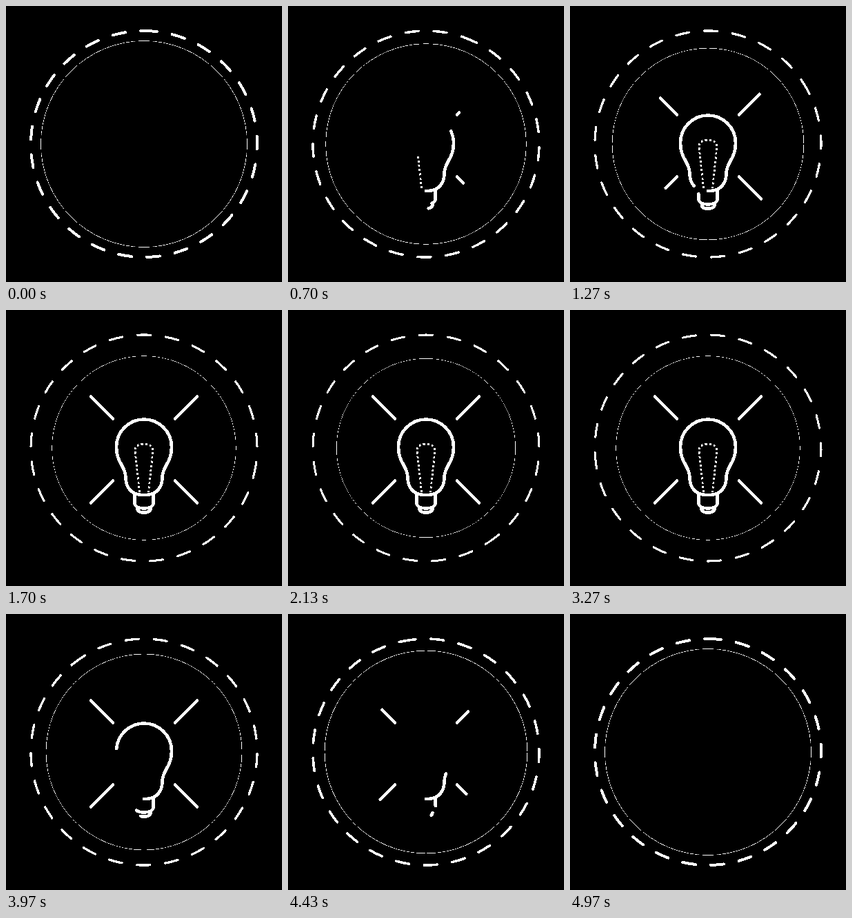
These frames come from a looping animation (400x400 px, 5010 ms). An HTML page:

```html
<!DOCTYPE html>
<html>
<head>
<meta charset="utf-8">
<style>
html, body { margin: 0; width: 100%; height: 100%; overflow: hidden; background: #000; }
svg { display: block; width: 100vw; height: 100vh; }
svg * { fill: none; stroke: #fff; shape-rendering: crispEdges; }
.bulb, .ray { stroke-width: 4.6; stroke-linecap: round; stroke-linejoin: round; }
#dashes { stroke-linecap: round; stroke-dasharray: 19 22; }
#ring { shape-rendering: geometricPrecision; }
#dots { stroke-width: 2.8; stroke-dasharray: 3 3.2; }
#wipe { stroke-width: 6; }
</style>
</head>
<body>
<svg viewBox="0 0 400 400">
  <!-- Hard edge: keeps only pixels at least half covered -->
  <filter id="hard" filterUnits="userSpaceOnUse" x="0" y="0" width="400" height="400" color-interpolation-filters="sRGB">
    <feComponentTransfer><feFuncA type="discrete" tableValues="0 1"/></feComponentTransfer>
  </filter>
  <mask id="reveal" maskUnits="userSpaceOnUse" x="0" y="0" width="400" height="400">
    <path id="wipe" pathLength="1" d="M193.5 264L187.3 207C186 198 190 194.5 200 194.5S214 198 212.7 207L206.5 264"/>
  </mask>
  <circle id="dashes" cx="200" cy="200" r="164"/>
  <g filter="url(#hard)"><circle id="ring" cx="200" cy="200"/></g>
  <g mask="url(#reveal)">
    <path id="dots" d="M193.5 264L187.3 207C186 198 190 194.5 200 194.5S214 198 212.7 207L206.5 264"/>
  </g>
  <path class="bulb" pathLength="1" d="M200 268H204C219 267 226.5 256 226.5 243C226.5 226 240 222 240 198.5A40 40 0 0 0 160 198.5C160 222 173.5 226 173.5 243C173.5 256 181 267 196 268Z"/>
  <path class="bulb" pathLength="1" d="M213.7 268V279C213.7 285 207 287.5 200 287.5S186.3 285 186.3 279V268"/>
  <path class="bulb" pathLength="1" d="M209.5 288C209.5 295.5 190.5 295.5 190.5 288"/>
  <path class="ray" pathLength="1" d="M245 247.5L277 279.3"/>
  <path class="ray" pathLength="1" d="M245 157.5L277 125.5"/>
  <path class="ray" pathLength="1" d="M155 157.5L123 125.5"/>
  <path class="ray" pathLength="1" d="M155 247.5L123 279.3"/>
</svg>
<script>
const LOOP = 5010, LAST = 119, RADIUS = 149.5;
const $ = id => document.getElementById(id);
const all = s => [...document.querySelectorAll(s)];
const bulb = all('.bulb'), rays = all('.ray');

// Eased progress from a to b
function ease(x, a, b) {
  const u = Math.min(1, Math.max(0, (x - a) / (b - a)));
  return u * u * (3 - 2 * u);
}

function trim(path, part) {
  path.style.visibility = part > 0.002 ? 'visible' : 'hidden';
  path.style.strokeDasharray = part >= 1 ? 'none' : part + ' 2';
}

// Draws in from a to b, retracts from c to d
const inOut = (f, a, b, c, d) => ease(f, a, b) - ease(f, c, d);

function draw(ms) {
  // 24 fps motion shown on a 30 fps clock
  const tick = Math.floor((ms + 5) * 0.03);
  const f = Math.min(LAST, Math.floor(tick * 0.8 + 0.3));
  const u = f / LAST;

  $('dashes').setAttribute('transform', `rotate(${360 * ease(u, 0, 1) - 90} 200 200)`);
  $('dashes').style.strokeWidth = 4 - 4 * u * (1 - u);

  const scale = 1 - 0.14 * inOut(u, 0, 0.5, 0.5, 1);
  $('ring').setAttribute('r', RADIUS * scale);
  $('ring').style.strokeWidth = 0.8 * scale;

  trim($('wipe'), inOut(f, 10, 29, 79, 94));
  bulb.forEach(p => trim(p, inOut(f, 5, 35, 84, 114)));
  rays.forEach((p, i) => trim(p, inOut(f, 10 + 3.3 * i, 30 + 3.3 * i, 96 + i, 114 + i)));
}

const start = performance.now();
function loop() {
  draw((performance.now() - start) % LOOP);
  requestAnimationFrame(loop);
}
loop();
</script>
</body>
</html>
```
